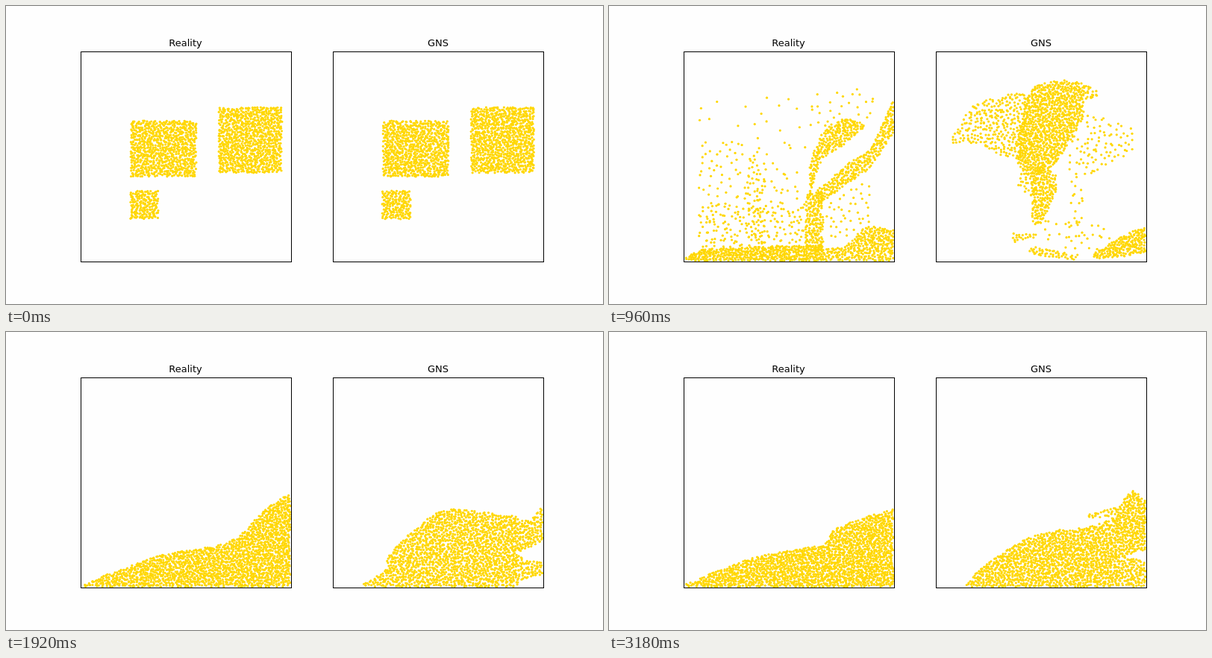
An HTML page with a canvas for the animation above (3.21 s loop, 800 by 400 pixels).

```html
<!DOCTYPE html>
<html lang="en">
<head>
<meta charset="utf-8">
<title>Reality and GNS</title>
<style>
  html, body { margin: 0; width: 100%; height: 100%; overflow: hidden; background: #fefefe; }
  canvas, svg { position: absolute; left: 0; top: 0; display: block; }
  rect { fill: none; stroke: #000; stroke-width: 1; }
  text { font: 13px "DejaVu Sans", sans-serif; text-anchor: middle; fill: #000; }
</style>
</head>
<body>
<canvas id="stage" width="800" height="400"></canvas>
<svg width="800" height="400">
  <rect x="100.5" y="61.5" width="282" height="282"/>
  <rect x="438.5" y="61.5" width="282" height="282"/>
  <text x="240.5" y="54">Reality</text>
  <text x="579" y="54">GNS</text>
</svg>
<script>
const LOOP = 3210, STEP = 30, GRAVITY = 1.05, FLOOR = 342;
const SIZES = [790, 900, 175];      // grains in the left, right and small block
const TOTAL = SIZES.reduce((a, b) => a + b);
const clock0 = performance.now();

let seed = 7;
function random() {
  seed = (seed * 1664525 + 1013904223) >>> 0;
  return seed / 4294967296;
}

// Catmull-Rom curve through points of any dimension.
function spline(knots) {
  const at = i => knots[Math.max(0, Math.min(knots.length - 1, i))];
  const out = [];
  for (let i = 0; i < knots.length - 1; i++) {
    for (let f = 0; f < 1; f += 0.125) {
      out.push(at(i).map((b, k) => {
        const a = at(i - 1)[k], c = at(i + 1)[k], d = at(i + 2)[k];
        return b + f / 2 * (c - a + f * (2 * a - 5 * b + 4 * c - d + f * (3 * (b - c) + d - a)));
      }));
    }
  }
  return [...out, at(knots.length)];
}

// Region between an upper and a lower curve, from knots [x, top, bottom].
function slab(density, ...knots) {
  const curve = spline(knots.map(([x, top, bottom = FLOOR]) => [x, top, bottom]));
  let area = 0;
  for (let i = 1; i < curve.length; i++) {
    const [x0, t0, b0] = curve[i - 1], [x1, t1, b1] = curve[i];
    area += (x1 - x0) * (b0 - t0 + b1 - t1) / 2;
  }
  return { curve, area, mass: area * density };
}

const box = (x, y, w, h) => slab(1, [x, y, y + h], [x + w, y, y + h]);

function inside(curve, x, y) {
  const i = curve.findIndex(p => p[0] >= x);
  if (i < 1) return false;
  const a = curve[i - 1], b = curve[i], f = (x - a[0]) / (b[0] - a[0]);
  return y >= a[1] + f * (b[1] - a[1]) && y <= a[2] + f * (b[2] - a[2]);
}

// Jittered hexagonal grid, tightened until it holds enough grains.
function scatter({ curve, area }, count) {
  const x0 = curve[0][0], x1 = curve[curve.length - 1][0];
  const y0 = Math.min(...curve.map(p => p[1])), y1 = Math.max(...curve.map(p => p[2]));
  let gap = Math.sqrt(area / Math.max(count, 1)) * 1.07, found = [];
  while (found.length < count) {
    found = [];
    for (let row = 0, y = y0; y < y1 + gap; y += gap * 0.866, row++) {
      for (let x = x0 + (row % 2) * gap / 2; x < x1 + gap; x += gap) {
        const px = x + (random() - 0.5) * gap * 0.9;
        const py = y + (random() - 0.5) * gap * 0.9;
        if (inside(curve, px, py)) found.push([px, py]);
      }
    }
    gap *= 0.975;
  }
  while (found.length > count) {
    found[Math.floor(random() * found.length)] = found[found.length - 1];
    found.pop();
  }
  return found;
}

function fill(slabs, count) {
  const mass = slabs.reduce((sum, s) => sum + s.mass, 0);
  let used = 0, soFar = 0;
  return slabs.flatMap(s => {
    soFar += s.mass;
    const n = Math.round(count * soFar / mass) - used;
    used += n;
    return scatter(s, n);
  });
}

// Pairs two point clouds by halving both along their wider side.
function pair(from, to, ids, out) {
  if (ids.length === 1) { out[ids[0]] = to[0]; return; }
  const span = k => {
    const side = ids.map(i => from[i][k]);
    return Math.max(...side) - Math.min(...side);
  };
  const k = span(0) > span(1) ? 0 : 1, half = ids.length >> 1;
  ids.sort((a, b) => from[a][k] - from[b][k]);
  to.sort((a, b) => a[k] - b[k]);
  pair(from, to.slice(0, half), ids.slice(0, half), out);
  pair(from, to.slice(half), ids.slice(half), out);
}

function build(poses) {
  const keys = [];
  for (const { t, groups } of poses) {
    const counts = groups.length === 1 ? [TOTAL] : SIZES;
    const pos = [];
    let first = 0;
    groups.forEach((slabs, g) => {
      const cloud = fill(slabs, counts[g]);
      const ids = cloud.map((_, i) => first + i);
      if (keys.length) pair(keys[keys.length - 1].pos, cloud, ids, pos);
      else pos.push(...cloud);
      first += counts[g];
    });
    keys.push({ t, pos });
  }
  return keys;
}

const pose = (t, ...groups) => ({ t, groups });
const blocks = dx =>
  pose(0, [box(167 + dx, 154, 88, 75)], [box(285 + dx, 136, 85, 88)], [box(166 + dx, 248, 38, 38)]);

const reality = build([
  blocks(0),
  pose(420,
    [slab(1, [104, 67, 188], [130, 77, 204], [160, 77, 184], [190, 70, 176], [223, 66, 72]),
     slab(0.4, [122, 100, 150], [192, 105, 160])],
    [slab(0.75, [293, 188, 214], [318, 148, 262], [345, 132, 274], [368, 118, 288]),
     slab(1, [368, 117, 165], [381, 116, 140]),
     slab(1, [368, 208, 288], [381, 250, 294])],
    [box(210.5, 173, 37, 38)]),
  pose(960,
    [slab(1, [103, 338], [135, 326], [289, 321]),
     slab(0.06, [120, 180, 325], [190, 190, 322], [262, 240, 320]),
     slab(0.1, [120, 265, 325], [262, 270, 322]),
     slab(0.14, [186, 185, 320], [210, 235, 320]),
     slab(0.014, [118, 125, 185], [270, 115, 230])],
    [slab(1, [269, 212, 255], [285, 172, 208], [312, 152, 188], [341, 158, 165]),
     slab(1, [278, 248, 268], [320, 212, 238], [350, 190, 216], [381, 126, 170]),
     slab(1, [290, 325], [318, 321], [345, 297], [381, 301]),
     slab(0.07, [268, 120, 170], [355, 108, 160]),
     slab(0.1, [290, 255, 320], [352, 230, 296])],
    [slab(1, [263, 252, 330], [287, 248, 330])]),
  pose(1440,
    [slab(1, [103, 338], [160, 319], [215, 298], [270, 289], [344, 269], [381, 298]),
     slab(1, [344, 214, 268], [362, 180, 274], [381, 163, 250]),
     slab(0.01, [128, 225, 300], [325, 228, 265])]),
  pose(1920, [slab(1, [103, 338], [155, 318], [210, 299], [300, 281], [345, 240], [381, 216])]),
  pose(2400, [slab(1, [103, 338], [150, 319], [205, 300], [285, 285], [300, 267], [335, 251], [381, 238])])
]);

const GNS = build([
  blocks(338),
  pose(420,
    [slab(1, [444, 66, 135], [480, 63, 136], [515, 63, 152], [546, 70, 95])],
    [slab(0.75, [579, 168, 202], [610, 138, 225], [642, 117, 244]),
     slab(0.5, [642, 117, 160], [680, 114, 165], [714, 121, 142]),
     slab(0.25, [642, 160, 235], [690, 178, 215]),
     slab(0.5, [642, 230, 245], [665, 225, 265], [695, 212, 267], [718, 246, 266]),
     slab(0.6, [662, 247, 266], [718, 247, 266])],
    [box(546.5, 182, 38, 38)]),
  pose(960, [
    slab(0.4, [460, 177, 189], [488, 134, 184], [520, 122, 198], [560, 113, 212]),
    slab(0.9, [548, 175, 212], [566, 113, 228], [600, 100, 208], [636, 103, 150]),
    slab(0.6, [634, 104, 125], [655, 113, 123]),
    slab(0.8, [567, 225, 292], [580, 215, 290], [599, 225, 250]),
    slab(0.4, [548, 222, 240], [572, 228, 264]),
    slab(0.15, [635, 142, 230], [670, 153, 215], [706, 165, 190]),
    slab(0.1, [615, 175, 310], [635, 175, 310]),
    slab(0.07, [580, 285, 330], [672, 290, 330]),
    slab(0.5, [540, 303, 320], [572, 306, 310]),
    slab(0.6, [563, 322, 333], [628, 333, 342]),
    slab(1, [650, 332, 339], [690, 308, 336], [719, 295, 330])]),
  pose(1440, [
    slab(0.8, [481, 288, 300], [510, 282, 303], [532, 254, 304], [558, 242, 305]),
    slab(1, [558, 242], [580, 198], [603, 170, 332]),
    slab(1, [603, 170, 258], [622, 157, 242], [645, 150, 215], [662, 148, 180]),
    slab(0.65, [662, 148, 178], [690, 150, 167], [719, 156, 181]),
    slab(1, [603, 285], [614, 322]),
    slab(0.7, [495, 338], [558, 328]),
    slab(0.8, [614, 331, 342], [665, 326, 340], [695, 305, 335], [719, 274, 318]),
    slab(0.5, [640, 249, 258], [692, 260, 267]),
    slab(0.12, [634, 275, 320], [684, 275, 322])]),
  pose(1920, [
    slab(1, [478, 339], [508, 318], [514, 298], [570, 246], [600, 238], [682, 247]),
    slab(1, [682, 247, 297], [701, 253, 290], [719, 233, 280]),
    slab(0.9, [682, 297, 342], [700, 306, 330], [719, 308, 326])]),
  pose(2400, [
    slab(1, [475, 341], [520, 298], [570, 269], [620, 265], [686, 244]),
    slab(1, [686, 244, 298], [701, 222, 298], [719, 227, 292]),
    slab(0.85, [686, 298], [719, 309]),
    slab(1, [687, 201, 213], [700, 197, 224], [712, 209, 228])]),
  pose(3180, [
    slab(1, [475, 341], [510, 308], [575, 271], [645, 261], [686, 244]),
    slab(1, [686, 232, 298], [701, 213, 298], [719, 227, 292]),
    slab(0.85, [686, 298], [719, 309]),
    slab(0.8, [642, 245, 251], [686, 233, 245])])
]);

// Ballistic at first, then falling grains land and the pile settles.
function place(a, b, s, leg, steps) {
  const dx = b[0] - a[0], dy = b[1] - a[1];
  const ease = s * (2 - s);
  const x = a[0] + dx * (leg < 2 ? s : ease);
  if (leg === 0) return [x, a[1] + dy * s - GRAVITY / 2 * steps * steps * s * (1 - s)];
  if (dy <= 0 || leg > 2) return [x, a[1] + dy * ease];
  const land = Math.min(1, Math.max(0.4, Math.sqrt(2 * dy / GRAVITY) / steps));
  return [x, a[1] + dy * Math.min(1, (s / land) ** 2)];
}

const ctx = document.getElementById("stage").getContext("2d");
ctx.fillStyle = "#ffd700";

function drawPanel(keys, left, t) {
  let leg = 0;
  while (leg < keys.length - 2 && t >= keys[leg + 1].t) leg++;
  const a = keys[leg], b = keys[leg + 1];
  const s = Math.min(1, (t - a.t) / (b.t - a.t)), steps = (b.t - a.t) / STEP;
  ctx.save();
  ctx.beginPath();
  ctx.rect(left, 61, 283, 283);
  ctx.clip();
  for (let i = 0; i < TOTAL; i++) {
    const [x, y] = place(a.pos[i], b.pos[i], s, leg, steps);
    ctx.beginPath();
    ctx.arc(Math.min(left + 281.5, Math.max(left + 2, x)), Math.min(FLOOR, Math.max(63, y)), 1.6, 0, 7);
    ctx.fill();
  }
  ctx.restore();
}

let shown = -1;
function draw() {
  const t = Math.floor((performance.now() - clock0) % LOOP / STEP) * STEP;
  if (t !== shown) {
    shown = t;
    ctx.clearRect(0, 0, 800, 400);
    drawPanel(reality, 100, t);
    drawPanel(GNS, 438, t);
  }
  requestAnimationFrame(draw);
}
draw();
</script>
</body>
</html>
```
